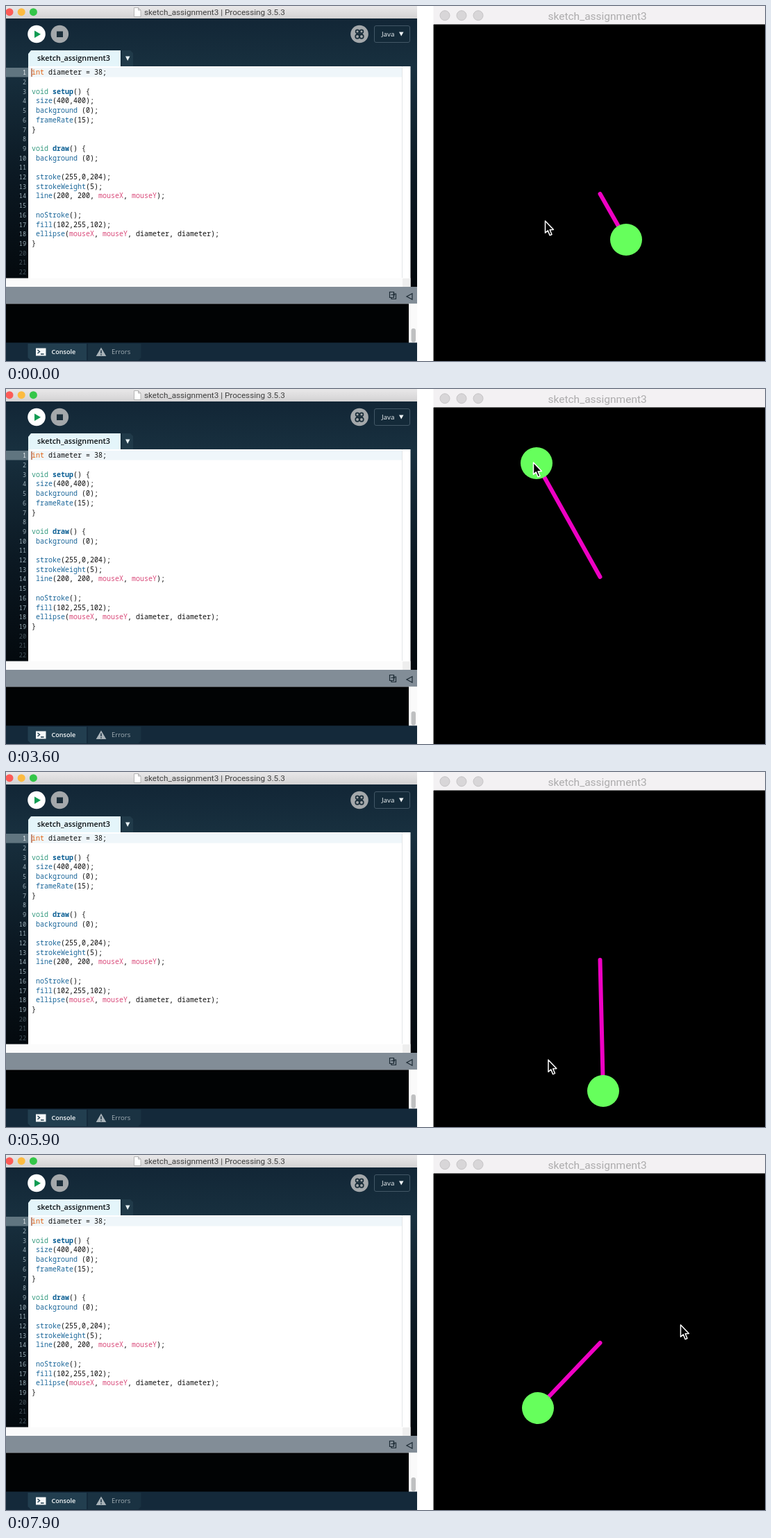
An HTML page that plays this animation: 1093 by 512 pixels, repeating every 8 s.

```html
<!DOCTYPE html>
<html lang="en">
<head>
<meta charset="utf-8">
<title>sketch_assignment3</title>
<style>
  html, body { margin: 0; width: 100%; height: 100%; overflow: hidden; background: #fff; }
  svg { display: block; width: 1093px; height: 512px; }
  text { white-space: pre; }
  .title { font-family: Roboto, sans-serif; }
  .ui { font-family: "Open Sans", sans-serif; }
  .code { font: 10px "Noto Sans Mono", monospace; fill: #111; }
  .num { font: 8.5px "Noto Sans Mono", monospace; text-anchor: end; }
  .type { fill: #33997e; }
  .int { fill: #e2661a; }
  .fn { fill: #1a6699; }
  .def { fill: #0b5f94; font-weight: 700; }
  .var { fill: #d94a7a; }
</style>
</head>
<body>
<svg viewBox="0 0 1093 512">
  <defs>
    <linearGradient id="bar" x2="0" y2="1">
      <stop stop-color="#e9e8e9"/><stop offset="1" stop-color="#d3d2d3"/>
    </linearGradient>
    <linearGradient id="navy" x2="0" y2="1">
      <stop stop-color="#122636"/><stop offset=".18" stop-color="#18303f"/>
      <stop offset=".6" stop-color="#0b1822"/><stop offset="1" stop-color="#03080c"/>
    </linearGradient>
    <clipPath id="view"><path d="M616 26.500H1093V512H616Z"/></clipPath>
  </defs>

  <!-- editor window -->
  <path fill="url(#navy)" d="M0 18H592V405H0Z"/>
  <path fill="url(#bar)" d="M0 0H592V18H0Z"/>
  <g id="lights"></g>
  <path d="M184.500 2.500H190.500L194 6V15.500H184.500ZM190.500 2.500V6H194" fill="#fff" stroke="#a8a8a8" stroke-width=".8"/>
  <text class="title" x="199" y="13.300" font-size="11.700" fill="#3f3f3f">sketch_assignment3 | Processing 3.5.3</text>

  <circle cx="44" cy="40.500" r="12.800" fill="#fff"/>
  <path d="M41 35.500L50 40.700L41 46Z" fill="#109c53"/>
  <circle cx="77.300" cy="40.500" r="12.800" fill="#a4a8ab"/>
  <path d="M73 36.500H82V45H73Z" fill="#1c2f3b"/>
  <circle cx="509" cy="40.500" r="12.800" fill="#a4a8ab"/>
  <g fill="none" stroke="#1c2f3b" stroke-width="1.700">
    <circle cx="506" cy="36.800" r="2.400"/><circle cx="512" cy="36.800" r="2.400"/>
    <circle cx="506" cy="44" r="2.800"/><circle cx="512" cy="44" r="2.800"/>
    <path d="M509 36V46M504 40.500H514"/>
  </g>
  <rect x="530.500" y="28.500" width="51" height="24" rx="2.500" fill="#142a39" stroke="#425766"/>
  <text class="ui" x="541" y="44" font-size="9.800" fill="#eef3f5">Java</text>
  <path d="M566 37.500H572.500L569.200 43.500Z" fill="#eef3f5"/>

  <path d="M32 88V69L36 64H165V88Z" fill="#e4f5fa"/>
  <text class="ui" x="45" y="79.300" font-size="10.800" font-weight="600" fill="#0a0f12">sketch_assignment3</text>
  <path d="M167 87V64H179L183 68V87Z" fill="#203a49"/>
  <path d="M172 72.500H178.500L175.200 79Z" fill="#e8f2f5"/>

  <path fill="#fff" d="M32 87H582.500V393H32Z"/>
  <path fill="#fbfbfb" d="M0 392.500H582.500V405H0Z"/>
  <path fill="#eeeeee" d="M571 393H582.500V405H571Z"/>
  <path fill="#eff6fa" d="M32 89H570V102.500H32Z"/>
  <path fill="#607580" d="M0 89H32V102.500H0Z"/>
  <path stroke="#e3e6e8" d="M570.500 87V392"/>
  <g id="code"></g>
  <path stroke="#a5441c" stroke-width="1.200" d="M37 90V102"/>

  <path fill="#828d97" d="M0 405H592V429.500H0Z"/>
  <g fill="none" stroke="#1c2a34" stroke-width="1.200">
    <path d="M552.500 412.500H558.500V420.500H552.500ZM555 420.500V422.500H561.500V415H558.500M554.500 416.500H559.500M557.500 414.500L559.500 416.500L557.500 418.500"/>
    <path d="M585 414.800V423.200L577 419Z"/>
  </g>
  <path fill="#010304" d="M0 429.500H580V486H0Z"/>
  <path fill="#fafafa" d="M580 429.500H592V486H580Z"/>
  <rect x="583.500" y="465" width="6.500" height="20" rx="3.250" fill="#bfc0c1"/>
  <path fill="#14293a" d="M0 485.500H592V512H0Z"/>
  <path fill="#223e4f" d="M31.500 487H116V511H35.500L31.500 507Z"/>
  <path fill="#1a3242" d="M118 487H194.500V507L190.500 511H118Z"/>
  <path fill="#f5f8f9" d="M43 493.500H57.500V504.500H43Z"/>
  <path fill="none" stroke="#223e4f" stroke-width="1.400" d="M45.500 496L48.500 498.500L45.500 501M50 502H54.500"/>
  <text class="ui" x="65.500" y="502.300" font-size="9.100" font-weight="600" fill="#f5f8f9">Console</text>
  <path d="M137 492.500L144.300 505H129.700Z" fill="#a9b3b9"/>
  <path stroke="#1a3242" stroke-width="1.500" d="M137 496.500V501M137 502.200V503.700"/>
  <text class="ui" x="152" y="502.300" font-size="9.600" fill="#a2aeb5">Errors</text>

  <!-- running sketch -->
  <path fill="#8f8f8f" d="M615 26.500H616V512H615Z"/>
  <path fill="#f3f1f3" d="M615.500 0H1093V27H615.500Z"/>
  <g id="dimmed" stroke="#c6c4c6"></g>
  <text class="title" x="780.500" y="19.700" font-size="15.500" fill="#adacad">sketch_assignment3</text>
  <path d="M616 26.500H1093V512H616Z"/>
  <g clip-path="url(#view)">
    <line id="rod" x1="855.500" y1="271" stroke="#ee00c3" stroke-width="6" stroke-linecap="round"/>
    <circle id="ball" r="23" fill="#66ff5c"/>
  </g>
  <path id="arrow" d="M.5 1V18.300L4.300 14.900L7.100 21.700L10 20.500L7.200 13.800L12.400 13.500Z" fill="#050505" stroke="#fff" stroke-width="1.500" stroke-linejoin="round"/>
</svg>
<script>
const $ = id => document.getElementById(id);

const lights = (colors, x, gap, y, r) => colors.map((c, i) =>
  `<circle cx="${x + gap * i}" cy="${y}" r="${r}" fill="${c}"/>`).join("");
$("lights").innerHTML = lights(["#fc5b57", "#fcbb40", "#34c648"], 5, 17.2, 8.7, 5.5);
$("dimmed").innerHTML = lights(Array(3).fill("#d8d6d8"), 632, 24, 13.7, 7);

const program = `int diameter = 38;

void setup() {
 size(400,400);
 background (0);
 frameRate(15);
}

void draw() {
 background (0);

 stroke(255,0,204);
 strokeWeight(5);
 line(200, 200, mouseX, mouseY);

 noStroke();
 fill(102,255,102);
 ellipse(mouseX, mouseY, diameter, diameter);
}


`.split("\n");

const rules = [
  [/^int$/, "int"], [/^void$/, "type"], [/^(setup|draw)$/, "def"], [/^mouse[XY]$/, "var"],
  [/^(size|background|frameRate|stroke|strokeWeight|line|noStroke|fill|ellipse)$/, "fn"]
];
const paint = line => line.replace(/[A-Za-z]+/g, word => {
  const rule = rules.find(([test]) => test.test(word));
  return rule ? `<tspan class="${rule[1]}">${word}</tspan>` : word;
});
$("code").innerHTML = program.map((line, i) => {
  const y = 99.3 + 13.7 * i;
  const tint = i === 0 ? "#edf4f7" : i > 18 ? "#46545d" : "#9db0ba";
  return `<text class="num" fill="${tint}" x="29" y="${y}">${i + 1}</text>` +
    `<text class="code" x="37" y="${y}">${paint(line)}</text>`;
}).join("");

// Pointer swings: the step they begin at, then points on the way.
// The first two points are one step apart; the rest are spread evenly.
const STEP = 100, LOOP = 8000;
const swings = [
  [-1, "893,337 776,309 700,150 870,330"],
  [10, "723,510 724,505 840,220 730,200"],
  [25, "906,335 931,291 1022,170 870,380 702,250"],
  [35, "764,107 759,105 650,260 960,400 960,100 640,220"],
  [51, "876,441 881,439 1060,240 860,460 640,230"],
  [64, "627,68 788,278 880,240 640,150 720,400"],
  [78, "766,365 971,244"]
];
const path = swings.flatMap(([from, points], i) => {
  const list = points.split(" ").map(p => p.split(",").map(Number));
  const end = i + 1 < swings.length ? swings[i + 1][0] : from + 2;
  const gap = (end - from - 1) / (list.length - 1);
  return list.map((p, j) => [j ? from + 1 + (j - 1) * gap : from, ...p]);
});

function slope(i, k) {
  const a = path[Math.max(i - 1, 0)], b = path[Math.min(i + 1, path.length - 1)];
  return (b[k] - a[k]) / (b[0] - a[0]);
}

// Smooth curve through the path points
function pointer(s) {
  let i = 0;
  while (i < path.length - 2 && path[i + 1][0] <= s) i++;
  const a = path[i], b = path[i + 1], d = b[0] - a[0], u = (s - a[0]) / d, v = 1 - u;
  return [1, 2].map(k =>
    v * v * (1 + 2 * u) * a[k] + u * u * (3 - 2 * u) * b[k] +
    d * u * v * (v * slope(i, k) - u * slope(i + 1, k)));
}

function set(id, attrs) {
  for (const name in attrs) $(id).setAttribute(name, attrs[name]);
}

// The sketch reads the pointer one step late.
function draw(ms) {
  const s = Math.floor(ms % LOOP / STEP);
  const [x, y] = pointer(s), [cx, cy] = pointer(s - 1);
  set("arrow", { transform: `translate(${x} ${y})` });
  set("rod", { x2: cx, y2: cy });
  set("ball", { cx, cy });
}

const start = performance.now();
function tick() {
  draw(performance.now() - start);
  requestAnimationFrame(tick);
}
tick();
</script>
</body>
</html>
```
